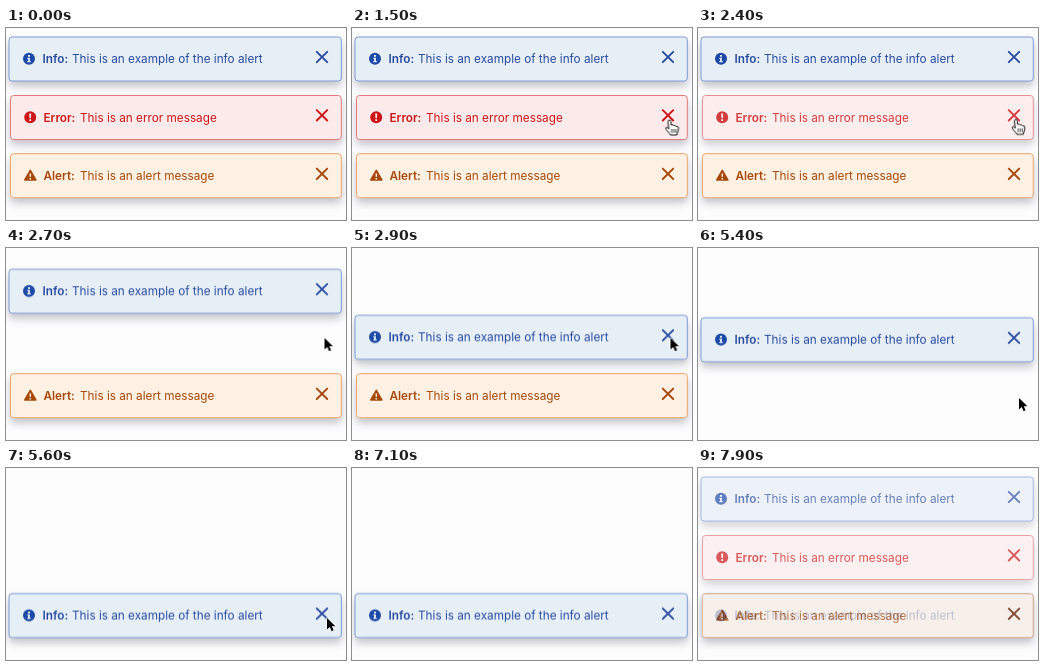
Write an HTML page that moves like this. It is 340x192 px and loops after 8000 ms.

```html
<!DOCTYPE html>
<html lang="en">
<head>
<meta charset="utf-8">
<title>Dismissible alerts</title>
<style>
  html, body { margin: 0; width: 100%; height: 100%; overflow: hidden; background: #fefdfe; }
  svg { display: block; width: 100%; height: 100%; }
  text { font: 400 11.75px Inter, "Open Sans", sans-serif; fill: currentColor; }
  .label { font-weight: 600; }
  .card { filter: drop-shadow(0 5px 4px rgba(30, 30, 50, .26)); }
  .box { stroke-width: 1; }
  .cross { fill: none; stroke: currentColor; stroke-width: 1.9; stroke-linecap: round; }
  .mark { fill: var(--bg); }

  .info { color: #284b9f; --bg: #e6eef6; --line: #7f9dd6; }
  .error { color: #cb1518; --bg: #fdebeb; --line: #e27b7b; }
  .alert { color: #a64806; --bg: #fff0e4; --line: #eba66c; }
  .box { fill: var(--bg); stroke: var(--line); }

  .slide, .gone1, .gone2, .restart, .move, .arrow, .hand, .cursor { animation: 8s linear infinite; }
  .slide { animation-name: slide; }
  .gone1 { animation-name: gone1; }
  .gone2 { animation-name: gone2; }
  .restart { animation-name: restart; }
  .cursor { animation-name: cursor; }
  .move { animation-name: move; }
  .arrow { animation-name: arrow; }
  .hand { animation-name: hand; }

  @keyframes slide {
    0% { transform: translateY(0); }
    32.59% { transform: translateY(0); animation-timing-function: cubic-bezier(.65, 0, .35, 1); }
    35.71%, 66.8% { transform: translateY(58.3px); }
    66.88% { transform: translateY(58.3px); animation-timing-function: cubic-bezier(.65, 0, .35, 1); }
    70%, 100% { transform: translateY(116.6px); }
  }
  @keyframes gone1 { 0%, 29.5% { opacity: 1; } 32.5%, 100% { opacity: 0; } }
  @keyframes gone2 { 0%, 62% { opacity: 1; } 65.5%, 100% { opacity: 0; } }
  @keyframes restart { 0%, 93.75% { opacity: 0; } 98.75% { opacity: .7; } 100% { opacity: 1; } }

  @keyframes cursor {
    0%, 7.49% { opacity: 0; }
    7.5%, 77.4% { opacity: 1; }
    77.5%, 100% { opacity: 0; }
  }
  @keyframes move {
    0%, 7.5% { transform: translate(325px, 113px); }
    10%, 12% { transform: translate(322px, 109px); animation-timing-function: ease-in-out; }
    17.5%, 29% { transform: translate(317.5px, 92px); }
    32%, 44% { transform: translate(318.5px, 90px); animation-timing-function: ease-in-out; }
    50.5%, 51.5% { transform: translate(320px, 141px); animation-timing-function: ease-out; }
    55%, 73.5% { transform: translate(321px, 150px); animation-timing-function: ease-in; }
    77.5%, 100% { transform: translate(345px, 159px); }
  }
  @keyframes arrow {
    0%, 15.9% { opacity: 1; }
    16%, 31.2% { opacity: 0; }
    31.3%, 49.3% { opacity: 1; }
    49.4%, 64.9% { opacity: 0; }
    65%, 100% { opacity: 1; }
  }
  @keyframes hand {
    0%, 15.9% { opacity: 0; }
    16%, 31.2% { opacity: 1; }
    31.3%, 49.3% { opacity: 0; }
    49.4%, 64.9% { opacity: 1; }
    65%, 100% { opacity: 0; }
  }
</style>
</head>
<body>
<svg viewBox="0 0 340 192" preserveAspectRatio="none">
  <defs>
    <path id="cross" class="cross" d="M310.8 14.8l10.4 10.4m0-10.4l-10.4 10.4"/>

    <g id="info" class="info">
      <rect class="box card" x="3" y="9" width="332.3" height="44" rx="3"/>
      <circle cx="23" cy="30.8" r="6" fill="#1d4aa6"/>
      <path class="mark" d="M22 26.9h2v1.8h-2zM21.4 29.8h2.5v3.2h.8v1.3h-3.4v-1.3h.8v-1.9h-.7z"/>
      <text x="36.5" y="35" class="label">Info:</text>
      <text x="66" y="35">This is an example of the info alert</text>
      <use href="#cross" y="9"/>
    </g>

    <g id="error" class="error">
      <rect class="box card" x="4.5" y="67.5" width="330.8" height="44" rx="3"/>
      <circle cx="24.2" cy="89.2" r="6" fill="currentColor"/>
      <path class="mark" d="M23.2 85.4h2l-.3 4.8h-1.4zM23.3 91.2h1.8v1.8h-1.8z"/>
      <text x="37.5" y="93.5" class="label">Error:</text>
      <text x="74" y="93.5">This is an error message</text>
      <use href="#cross" y="67.3"/>
    </g>

    <g id="alert" class="alert">
      <rect class="box card" x="4.5" y="125.7" width="330.8" height="44" rx="3"/>
      <path d="M24.3 142.4l5.5 9.6h-11z" fill="currentColor" stroke="currentColor" stroke-width="1.6" stroke-linejoin="round"/>
      <path class="mark" d="M23.5 145.4h1.6l-.2 3.6h-1.2zM23.5 149.9h1.6v1.5h-1.6z"/>
      <text x="37.5" y="151.8" class="label">Alert:</text>
      <text x="74" y="151.8">This is an alert message</text>
      <use href="#cross" y="125.8"/>
    </g>
  </defs>

  <use href="#alert" class="gone2"/>
  <use href="#error" class="gone1"/>
  <use href="#info" class="slide"/>

  <g class="cursor">
    <g class="move">
      <path class="arrow" d="M0 0V11.6L2.8 9l1.8 4.2 2-.9-1.8-4.1h3.6z" fill="#000" stroke="#fff" stroke-width="1.2" paint-order="stroke" stroke-linejoin="round"/>
      <g class="hand" stroke="#111" stroke-linejoin="round" stroke-linecap="round">
        <path fill="#fff" d="M-1.4 1.5Q-1.3 0 0 0T1.4 1.5L1.7 5Q3.5 4.2 4.2 5.6Q6 5 6.6 6.4Q8.8 6 9 8L8.6 11Q7.6 13 7.4 15H1Q0 13-3.4 9.4Q-4.4 7.4-2.6 7.2Q-1.6 7.4-.9 8.6z"/>
        <path fill="none" stroke-width=".8" d="M2.1 9.4v3M4.2 9.4v3M6.3 9.4v3"/>
      </g>
    </g>
  </g>

  <g class="restart">
    <rect width="340" height="192" fill="#fefdfe"/>
    <use href="#alert"/>
    <use href="#error"/>
    <use href="#info"/>
  </g>
</svg>
</body>
</html>
```
